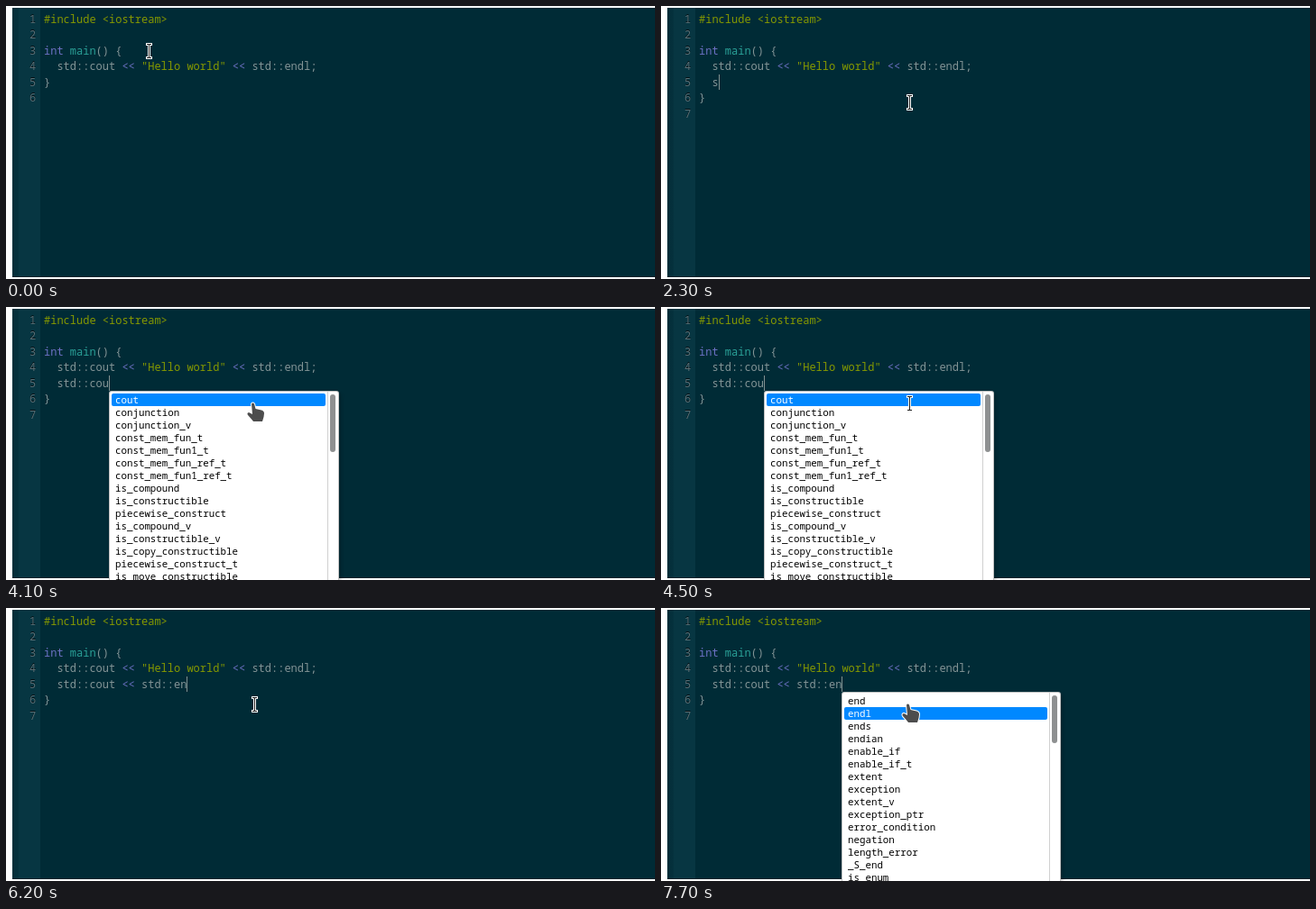
Recreate the animation shown at these times as an HTML page with a canvas. Size 719 by 303 pixels, loop 8 s.

```html
<!DOCTYPE html>
<html lang="en">
<head>
<meta charset="utf-8">
<style>
  html, body { margin: 0; width: 100%; height: 100%; overflow: hidden; background: #fff; }
  canvas { display: block; }
</style>
</head>
<body>
<canvas id="stage" width="719" height="303"></canvas>
<script>
const ctx = document.getElementById('stage').getContext('2d', { alpha: false });
const LOOP = 8000, STEP = 100;
const CODE_X = 42, CHAR = 7.2;
const MONO = '"Noto Sans Mono", monospace';

const TYPED = 'std::cout << std::en';
const KEY_TIMES = [2300, 2800, 3000, 3200, 3300, 3500, 3600, 3700, 4600, 4900,
  5000, 5100, 5200, 5300, 5500, 5600, 5800, 5900, 6100, 6200];
const OPEN_LINE = 2200;

const COUT_HINTS = ['cout', 'conjunction', 'conjunction_v', 'const_mem_fun_t', 'const_mem_fun1_t',
  'const_mem_fun_ref_t', 'const_mem_fun1_ref_t', 'is_compound', 'is_constructible',
  'piecewise_construct', 'is_compound_v', 'is_constructible_v', 'is_copy_constructible',
  'piecewise_construct_t', 'is_move_constructible'];
const END_HINTS = ['end', 'endl', 'ends', 'endian', 'enable_if', 'enable_if_t', 'extent', 'exception',
  'extent_v', 'exception_ptr', 'error_condition', 'negation', 'length_error', '_S_end', 'is_enum'];

const during = (t, from, to) => t >= from && t < to;
const lineTop = row => Math.floor(6 + 17.5 * row);
const columnX = col => CODE_X + col * CHAR;

function rect(x, y, w, h, color) {
  ctx.fillStyle = color;
  ctx.fillRect(x, y, w, h);
}

function pill(x, y, w, h, r, color) {
  ctx.fillStyle = color;
  ctx.beginPath();
  ctx.roundRect(x, y, w, h, r);
  ctx.fill();
}

function text(str, x, y, color) {
  ctx.fillStyle = color;
  ctx.fillText(str, x, y);
}

function tokenColor(token) {
  if (/^[#"]/.test(token)) return '#859900';
  if (token === 'main') return '#2aa198';
  if (token === 'int' || token[0] === '<') return '#6c71c4';
  return '#839496';
}

function codeLine(str, row) {
  const y = lineTop(row) + 13;
  for (const m of str.matchAll(/#.*|".*?"|\bint\b|\bmain\b|<+|[^\s<"]/g))
    text(m[0], columnX(m.index), y, tokenColor(m[0]));
}

function drawEditor(t) {
  rect(0, 0, 719, 303, '#fff');
  rect(7, 2, 712, 299, '#002b36');
  rect(7, 300, 712, 1, '#00222b');
  const edge = ctx.createLinearGradient(7, 0, 14, 0);
  edge.addColorStop(0, '#042e39');
  edge.addColorStop(1, '#05313d');
  rect(7, 2, 31, 298, '#073642');
  rect(7, 2, 7, 298, edge);

  if (during(t, 700, 1200) || during(t, 1800, 1900)) rect(128, lineTop(2), 8, 17, '#7e7');
  if (during(t, 1900, OPEN_LINE)) rect(128, lineTop(3), 8, 17, '#7e7');

  const lines = ['#include <iostream>', '', 'int main() {',
    '  std::cout << "Hello world" << std::endl;', '}', ''];
  const count = KEY_TIMES.filter(k => k <= t).length;
  if (t >= OPEN_LINE) lines.splice(4, 0, '  ' + TYPED.slice(0, count));

  ctx.font = '12px ' + MONO;
  lines.forEach((line, row) => {
    const y = lineTop(row) + 13;
    text(row + 1, 26, y - 1, '#021014');
    text(row + 1, 26, y, '#586e75');
    codeLine(line, row);
  });

  if (t >= OPEN_LINE && !during(t, 7200, 7700))
    rect(Math.round(columnX(2 + count)), lineTop(4), 1, 17, '#819090');
}

function drawHints(items, active, x, width, thumb) {
  const y = 93;
  ctx.save();
  ctx.shadowColor = 'rgba(0,0,0,.2)';
  ctx.shadowBlur = 5;
  ctx.shadowOffsetX = 2;
  ctx.shadowOffsetY = 3;
  pill(x, y, width, 222, 3, '#c0c0c0');
  ctx.restore();
  pill(x + 1, y + 1, width - 2, 220, 2, '#fff');

  const bar = x + width - 13;
  rect(bar, y + 1, 1, 220, '#d0d0d0');
  pill(bar + 3, y + 4, 6, thumb, 3, '#8e9091');

  ctx.font = '10.8px ' + MONO;
  items.forEach((item, i) => {
    const top = y + 3 + 14 * i;
    if (i === active) pill(x + 3, top, width - 18, 14, 2, '#08f');
    text(item, x + 7, top + 11, i === active ? '#fff' : '#000');
  });
}

function pointerAt(t) {
  const ease = p => p * p * (3 - 2 * p);
  const progress = (start, steps) => ease(Math.min(1, Math.max(0, (t - start + STEP) / (steps * STEP))));
  const a = progress(200, 3), b = progress(900, 5);
  return [Math.round(158 + 10 * a + 107 * b), Math.round(50 + 2 * a + 55 * b)];
}

function drawIBeam(x, y) {
  rect(x - 3, y - 9, 7, 3, '#fff');
  rect(x - 3, y + 6, 7, 3, '#fff');
  rect(x - 1, y - 8, 3, 16, '#fff');
  rect(x - 2, y - 8, 5, 1, '#222');
  rect(x - 2, y + 7, 5, 1, '#222');
  rect(x, y - 8, 1, 16, '#222');
}

function drawHand(x, y) {
  ctx.save();
  ctx.translate(x, y);
  ctx.fill(HAND_FILL(), 'nonzero');
  ctx.restore();
}

const HAND = new Path2D('M-3 .5Q-1.5-1.5 0 .5L1.5 6L8 7.5Q11 8.5 11 11L10.5 15L9 20H-1L-3 17.5L-7 13Q-8.5 10.5-6 10L-2 12Z');
function HAND_FILL() {
  ctx.lineJoin = 'round';
  ctx.lineWidth = 2;
  ctx.strokeStyle = '#fff';
  ctx.stroke(HAND);
  ctx.fillStyle = '#4d4d4d';
  return HAND;
}

function draw(now) {
  const t = Math.floor(now % LOOP / STEP) * STEP;
  drawEditor(t);
  if (during(t, 4100, 4600)) drawHints(COUT_HINTS, 0, 114, 255, 64);
  if (t >= 6600) drawHints(END_HINTS, t < 7700 ? 0 : 1, 200, 243, 53);

  const [x, y] = pointerAt(t);
  if (during(t, 4000, 4500) || t >= 7700) drawHand(x, y);
  else drawIBeam(x, y);
}

const start = performance.now();
function tick() {
  draw(performance.now() - start);
  requestAnimationFrame(tick);
}
tick();
</script>
</body>
</html>
```
